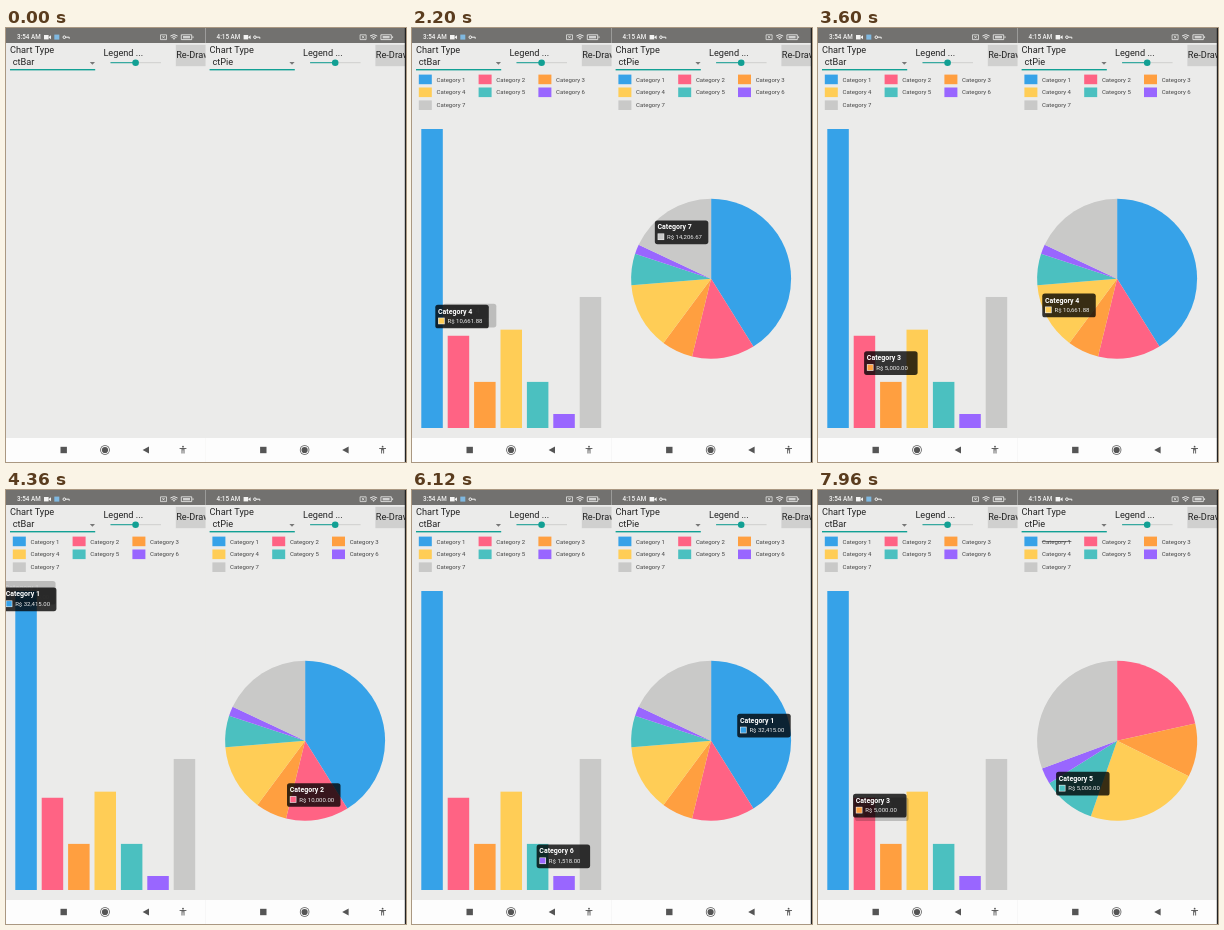
An HTML page with a canvas for the animation above (8 s loop, 400 px wide and 434 px high).

```html
<!DOCTYPE html>
<html lang="en">
<head>
<meta charset="utf-8">
<title>Charts</title>
<style>
  html, body { margin: 0; width: 100%; height: 100%; overflow: hidden; background: #ebebea; }
  canvas { display: block; width: 400px; height: 434px; }
</style>
</head>
<body>
<canvas id="stage"></canvas>
<script>
const LOOP = 8000, PANEL = 199.6, START = 120, HIDE_FIRST = 6900;
const COLORS = ['#36a2e8', '#ff6384', '#ff9f40', '#ffcd56', '#4bc0c0', '#9966ff', '#c9c9c8'];
const VALUES = [32415, 10000, 5000, 10661.88, 5000, 1518, 14206.67];
const TEAL = '#12a094', FONT = 'Roboto, sans-serif';
const BASE = 400, TOP = 101, PIE = { x: 99.5, y: 250.7, r: 80 };
const TIP = { w: 53.5, h: 23.7 };

// [time, category]; -1 hides the tooltip
const BAR_TIPS = [[1500, 1], [2193, 3], [3000, 2], [4000, 1], [4200, 0], [4650, 1], [4800, 2],
  [5000, 3], [5295, 4], [5880, 5], [6700, 4], [7050, 3], [7400, 1], [7882, 2]];
const PIE_TIPS = [[1300, 0], [1750, 6], [2700, 5], [2900, 4], [3150, 3], [3850, 2], [4020, 1],
  [4700, 3], [4850, 4], [5020, 6], [5760, 0], [6700, -1], [7300, 2], [7450, 3], [7600, 4]];

const canvas = document.getElementById('stage');
const ctx = canvas.getContext('2d');
const ratio = window.devicePixelRatio || 1;
canvas.width = 400 * ratio;
canvas.height = 434 * ratio;

const clamp = v => Math.max(0, Math.min(1, v));
const easeOut = v => 1 - (1 - clamp(v)) ** 4;
const mix = (a, b, k) => a + (b - a) * k;

function rect(x, y, w, h, fill) {
  ctx.fillStyle = fill;
  ctx.fillRect(x, y, w, h);
}

function text(str, x, y, size, fill, weight = 400) {
  ctx.font = `${weight} ${size}px ${FONT}`;
  ctx.fillStyle = fill;
  ctx.fillText(str, x, y);
}

function circle(x, y, r, fill) {
  ctx.beginPath();
  ctx.arc(x, y, r, 0, Math.PI * 2);
  ctx.fillStyle = fill;
  ctx.fill();
}

function polygon(points, fill) {
  ctx.beginPath();
  points.forEach(([x, y]) => ctx.lineTo(x, y));
  ctx.fillStyle = fill;
  ctx.fill();
}

function stroke(path, color, width) {
  ctx.strokeStyle = color;
  ctx.lineWidth = width;
  ctx.stroke(new Path2D(path));
}

function statusBar(clock, extraIcon) {
  rect(0, 0, 200, 15, '#72716f');
  const ink = '#f4f4f3';
  text(clock, 11, 11.4, 6.3, ink, 500);
  rect(38, 7, 4.6, 4.4, ink);
  polygon([[42.4, 9.2], [45, 7.2], [45, 11.2]], ink);
  if (extraIcon) rect(48.3, 6.6, 5, 5, '#7fb8e0');
  const key = extraIcon ? 57 : 48;
  stroke(`M${key} 9.2a1.3 1.3 0 1 0 2.6 0a1.3 1.3 0 1 0 -2.6 0M${key + 2.6} 9.2h3.6v1.5`, ink, 1);
  stroke('M154.5 6.8h6v4.8h-6zM156.3 8l2.4 2.4M158.7 8l-2.4 2.4', ink, .7);
  stroke('M164.4 8q3.6 -2.8 7.2 0M165.6 9.5q2.4 -1.8 4.8 0', ink, .9);
  polygon([[166.6, 10.2], [169.4, 10.2], [168, 11.8]], ink);
  stroke('M175.3 6.8h10.4v4.8h-10.4zM187 8.3v1.8', ink, .8);
  rect(177, 8, 7, 2.4, '#d0d0cf');
}

function controls(type) {
  text('Chart Type', 4, 25, 9.2, '#222');
  text(type, 6.8, 37.4, 9.2, '#222');
  polygon([[83.8, 34], [89, 34], [86.4, 36.8]], '#777');
  rect(4, 41, 85.2, 1.4, TEAL);
  text('Legend ...', 97.4, 28, 9.2, '#222');
  rect(104.5, 34.2, 50.5, 1, '#cfcfce');
  rect(104.5, 34.2, 25, 1, TEAL);
  circle(129.6, 34.7, 3.3, TEAL);
  rect(169.8, 16.8, 31, 21.4, '#d0d0cf');
  text('Re-Draw', 170.2, 30.3, 9.2, '#222');
}

function navBar() {
  rect(0, 410, 200, 24, '#fdfdfd');
  const ink = '#555';
  rect(54.5, 418.8, 6.4, 6.4, ink);
  circle(99, 422, 4.8, ink);
  circle(99, 422, 4, '#fdfdfd');
  circle(99, 422, 3.1, ink);
  polygon([[136.6, 422], [143, 418.4], [143, 425.6]], ink);
  circle(177, 418.7, .9, ink);
  stroke('M173.6 420.5h6.8M177 420v2.4M176 420.5v5M178 420.5v5', ink, .9);
}

function legend(firstHidden) {
  COLORS.forEach((color, i) => {
    const x = 6.8 + (i % 3) * 59.8, y = 46.6 + Math.floor(i / 3) * 12.9;
    rect(x, y, 13, 9.6, color);
    text(`Category ${i + 1}`, x + 17.7, y + 6.9, 6, '#444');
    if (i === 0 && firstHidden) rect(x + 17.5, y + 4.7, 29.5, .7, '#444');
  });
}

const barX = i => 9.3 + 26.4 * i;
const barHeight = i => VALUES[i] / VALUES[0] * (BASE - TOP);

function barChart(t) {
  const grow = easeOut((t - START) / 1000);
  COLORS.forEach((color, i) => {
    const h = barHeight(i) * grow;
    rect(barX(i), BASE - h, 21.5, h, color);
  });
}

// Start angle and sweep of every slice, clockwise from the top
function slices(hidden) {
  const weights = VALUES.map((v, i) => i ? v : v * (hidden ? 0 : 1));
  const total = weights.reduce((a, b) => a + b);
  let start = 0;
  return weights.map(w => {
    const slice = { start, sweep: w / total * Math.PI * 2 };
    start += slice.sweep;
    return slice;
  });
}
const FULL = slices(false), REDUCED = slices(true);

function pieChart(t) {
  const grow = easeOut((t - START) / 1000);
  const shrink = easeOut((t - HIDE_FIRST) / 1000);
  COLORS.forEach((color, i) => {
    const start = mix(FULL[i].start, REDUCED[i].start, shrink) * grow - Math.PI / 2;
    const sweep = mix(FULL[i].sweep, REDUCED[i].sweep, shrink) * grow;
    if (sweep < 1e-4) return;
    ctx.beginPath();
    ctx.moveTo(PIE.x, PIE.y);
    ctx.arc(PIE.x, PIE.y, PIE.r, start, start + sweep);
    ctx.fillStyle = color;
    ctx.fill();
  });
}

const barTarget = i => ({
  x: barX(i) + 10.75 - TIP.w / 2,
  y: BASE - barHeight(i) - 7 - TIP.h
});

function pieTarget(i, time) {
  const { start, sweep } = (time < HIDE_FIRST ? FULL : REDUCED)[i];
  const angle = start + sweep / 2;
  return {
    x: PIE.x + 55 * Math.sin(angle) - TIP.w / 2,
    y: PIE.y - 55 * Math.cos(angle) - TIP.h / 2
  };
}

function tipAt(events, target, t) {
  let pos = null, index = -1, alpha = 0;
  events.forEach(([time, next], n) => {
    if (time > t) return;
    const age = Math.min(t, n + 1 < events.length ? events[n + 1][0] : LOOP) - time;
    if (next < 0) {
      alpha = 1 - clamp(age / 200);
      return;
    }
    const to = target(next, time), k = easeOut(age / 400);
    const fresh = !pos || alpha === 0;
    pos = fresh ? to : { x: mix(pos.x, to.x, k), y: mix(pos.y, to.y, k) };
    alpha = fresh ? clamp(age / 200) : 1;
    index = next;
  });
  return { ...pos, index, alpha };
}

function drawTip({ x, y, index, alpha }, strength = 1) {
  if (index < 0 || alpha <= 0) return;
  ctx.save();
  ctx.globalAlpha = alpha * strength;
  ctx.translate(x, y);
  ctx.beginPath();
  ctx.roundRect(0, 0, TIP.w, TIP.h, 2.6);
  ctx.fillStyle = 'rgba(0, 0, 0, .78)';
  ctx.fill();
  text(`Category ${index + 1}`, 2.7, 9, 7, '#fff', 700);
  rect(2.8, 13, 6.6, 6.6, '#eee');
  rect(3.4, 13.6, 5.4, 5.4, COLORS[index]);
  const amount = VALUES[index].toLocaleString('en-US', { minimumFractionDigits: 2 });
  text(`R$ ${amount}`, 12.2, 18.5, 6, '#f2f2f2');
  ctx.restore();
}

// A faint leading image accompanies fast moves
function tooltip(events, target, t) {
  const now = tipAt(events, target, t), ahead = tipAt(events, target, t + 16);
  const moved = Math.hypot(ahead.x - now.x, ahead.y - now.y);
  if (moved > 3 && ahead.index === now.index) drawTip(ahead, .25);
  drawTip(now);
}

function phone(x, clock, type, t, chart, events, target) {
  const isPie = type === 'ctPie';
  ctx.save();
  ctx.translate(x, 0);
  ctx.beginPath();
  ctx.rect(0, 0, isPie ? 201 : PANEL, 434);
  ctx.clip();
  rect(0, 0, 201, 434, '#ebebea');
  statusBar(clock, !isPie);
  controls(type);
  if (t >= START) {
    legend(isPie && t >= HIDE_FIRST);
    chart(t);
    tooltip(events, target, t);
  }
  navBar();
  ctx.restore();
}

function draw(now) {
  const t = now % LOOP;
  ctx.setTransform(ratio, 0, 0, ratio, 0, 0);
  phone(0, '3:54 AM', 'ctBar', t, barChart, BAR_TIPS, barTarget);
  phone(PANEL, '4:15 AM', 'ctPie', t, pieChart, PIE_TIPS, pieTarget);
  rect(398.8, 0, 1.2, 434, '#222');
}

let origin;
function frame(now) {
  origin ??= now;
  draw(now - origin);
  requestAnimationFrame(frame);
}
draw(0);
requestAnimationFrame(frame);
</script>
</body>
</html>
```
